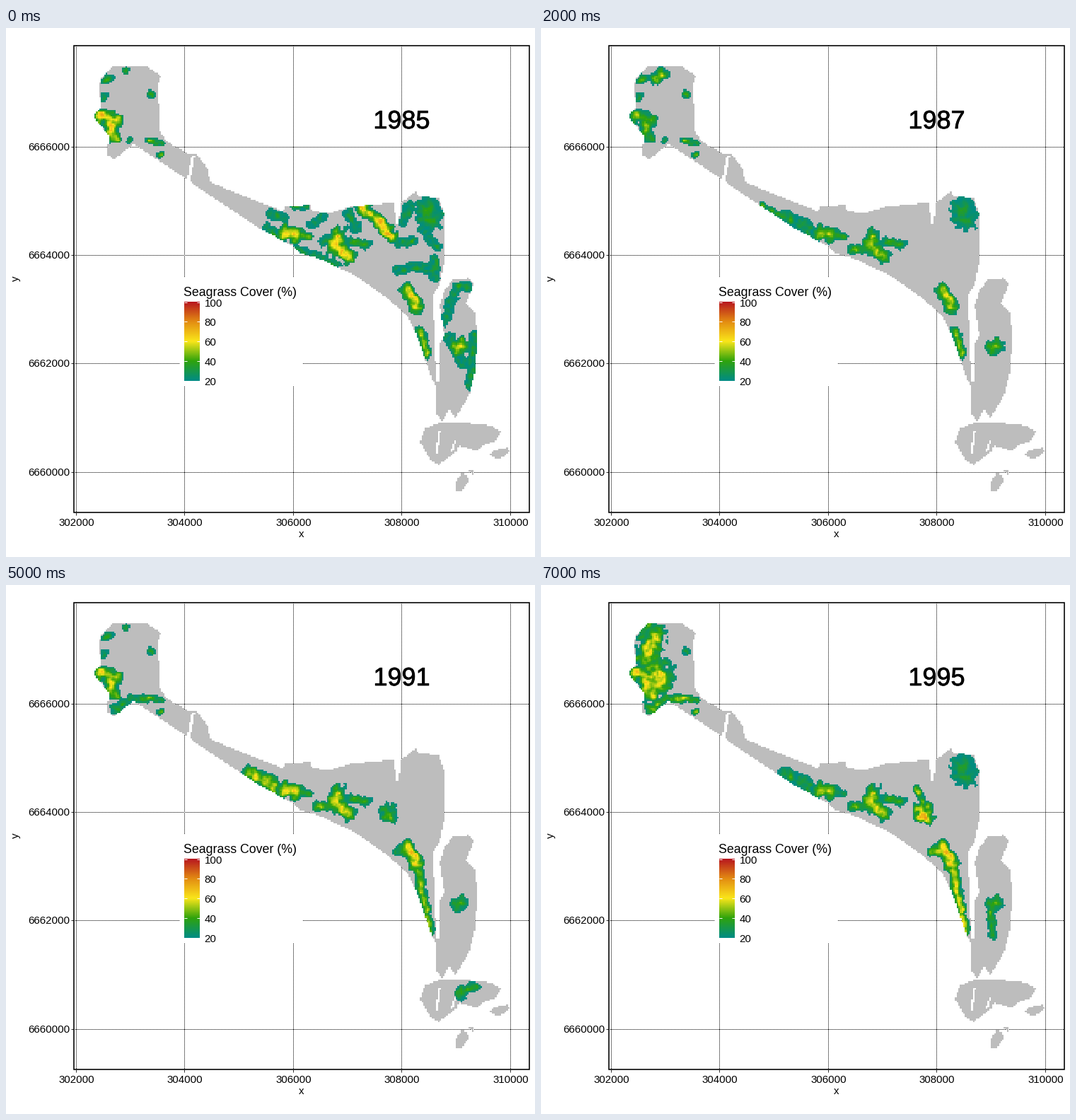
These frames come from a looping animation (748x748 px, 8 s). A matplotlib script:

```python
import numpy as np
import matplotlib.pyplot as plt
from matplotlib.animation import FuncAnimation
from matplotlib.colors import LinearSegmentedColormap
from matplotlib.path import Path
from matplotlib.patches import Rectangle
from matplotlib.patheffects import withStroke

SIZE, DPI = 748, 100
PX = 72 / DPI
CELL, COLS, ROWS = 2.3, 255, 262
LEFT, TOP = 125.0, 54.0
STEP = 153.4  # pixels per 2000 m
YEARS = [1985, 1986, 1987, 1988, 1990, 1991, 1993, 1995]

plt.rcParams["font.family"] = "Liberation Sans"
COVER = LinearSegmentedColormap.from_list(
    "cover", ["#008c84", "#2fa30c", "#fae61a", "#e38c12", "#b8171f"])

gx, gy = np.meshgrid(LEFT + (np.arange(COLS) + .5) * CELL,
                     TOP + (np.arange(ROWS) + .5) * CELL)

# Key points of the coast, in stage pixels
head = [(152, 54), (200, 55), (219, 68), (215, 79), (217, 145), (228, 161),
        (258, 178), (270, 178), (285, 200), (289, 218), (320, 231)]
north = [(358, 246), (392, 259), (395, 252), (430, 250), (433, 258), (455, 262),
         (490, 252), (548, 247), (551, 276), (555, 277), (558, 248), (570, 238),
         (579, 231), (582, 237), (612, 241), (620, 266), (619, 330), (613, 362),
         (604, 377), (604, 400), (608, 500)]
lobe = [(612, 500), (612, 450), (619, 434), (613, 392), (619, 372), (632, 355),
        (655, 354), (661, 362), (650, 389), (663, 402), (666, 440), (662, 490),
        (655, 518), (635, 551), (626, 537), (617, 557), (609, 545), (609, 507)]
south = [(602, 497), (583, 440), (568, 409), (540, 382), (490, 348), (440, 325),
         (415, 318), (405, 308), (360, 284), (275, 228), (260, 217)]
west = [(267, 181), (262, 181), (256, 214), (205, 180), (180, 164), (153, 186),
        (144, 179), (145, 152), (125, 127), (125, 121), (134, 113), (132, 82),
        (134, 72)]
islands = [
    [(592, 566), (614, 557), (640, 557), (686, 562), (700, 571), (690, 585),
     (672, 590), (667, 598), (640, 590), (637, 598), (612, 617), (600, 611),
     (585, 585)],
    [(684, 603), (690, 597), (708, 593), (711, 599), (700, 608), (688, 607)],
    [(654, 626), (661, 623), (661, 632)],
    [(636, 641), (645, 628), (652, 633), (655, 640), (643, 655), (635, 653)]]
slits = [[(611, 570), (614, 570), (610, 602), (607, 602)],
         [(633, 584), (636, 583), (632, 597), (628, 601)]]


def inside(outlines):
    cells = np.column_stack([gx.ravel(), gy.ravel()])
    hits = [Path(o).contains_points(cells) for o in outlines]
    return np.any(hits, axis=0).reshape(gx.shape)


def noise(seed, passes):
    n = np.random.default_rng(seed).normal(size=gx.shape)
    for _ in range(passes):
        for axis in (0, 1):
            n = (np.roll(n, 1, axis) + 2 * n + np.roll(n, -1, axis)) / 4
    return n / n.std()


def distance(path):
    """Distance of every cell to a path of points."""
    best = np.hypot(gx - path[0][0], gy - path[0][1])
    for (x0, y0), (x1, y1) in zip(path[:-1], path[1:]):
        dx, dy = x1 - x0, y1 - y0
        t = np.clip(((gx - x0) * dx + (gy - y0) * dy) / (dx * dx + dy * dy), 0, 1)
        best = np.minimum(best, np.hypot(gx - x0 - t * dx, gy - y0 - t * dy))
    return best


land = inside([head + north + lobe + south + west] + islands) & ~inside(slits)
ragged, grain = noise(4, 2), noise(9, 1)
beds = []


def bed(radius, growth, *paths):
    """A seagrass bed: growth maps key years to its cover above 20 %."""
    near = np.min([distance(p) for p in paths], axis=0)
    beds.append((radius, growth, near))


# Western head
bed(11, {1985: 42, 1987: 24, 1990: 34, 1995: 38},
    [(132, 124), (155, 130)], [(146, 134), (149, 150)])
bed(18, {1991: 0, 1993: 28, 1995: 34},
    [(160, 72), (151, 102)], [(160, 118), (172, 132), (155, 145)])
bed(7, {1985: 16, 1986: 20, 1990: 14, 1995: 10},
    [(138, 75), (150, 71)], [(139, 97)], [(170, 60)], [(206, 94)])
bed(10, {1985: 0, 1986: 18, 1987: 26, 1988: 0}, [(160, 72), (172, 66)])
bed(6, {1985: 18, 1990: 14, 1995: 22},
    [(175, 160)], [(203, 159), (220, 162)], [(219, 180)])
bed(7, {1988: 0, 1990: 9, 1993: 32, 1995: 28}, [(152, 177), (178, 161), (200, 161)])

# Shore fringe of a single year
bed(6, {1985: 0, 1986: 24, 1987: 0}, south + west[2:5], [(151, 158), (152, 182)],
    [(602, 497), (616, 512), (612, 545), (600, 566), (587, 580), (597, 606)])

# Southern slope and middle banks
bed(5, {1986: 0, 1987: 14, 1990: 0}, [(312, 251), (345, 268)])
bed(12, {1986: 0, 1987: 9, 1990: 22, 1993: 48, 1995: 10}, [(346, 267), (378, 284)])
bed(11, {1985: 38, 1987: 26, 1990: 32, 1993: 46, 1995: 28}, [(393, 290), (409, 291)])
bed(7, {1985: 24, 1987: 18, 1990: 18, 1995: 8}, [(412, 292), (428, 294)])
bed(12, {1985: 44, 1987: 30, 1990: 38, 1995: 36}, [(469, 294), (463, 308), (484, 322)])
bed(9, {1986: 0, 1987: 18, 1993: 24, 1995: 18}, [(440, 312), (458, 311)])
bed(8, {1985: 16, 1995: 17}, [(487, 303), (508, 307)])
bed(13, {1986: 0, 1987: 2, 1990: 20, 1993: 34, 1995: 54}, [(539, 318), (543, 326)])
bed(6, {1991: 0, 1993: 14, 1995: 20}, [(531, 288), (540, 310)])
bed(5, {1985: 12, 1986: 18, 1987: 0, 1988: 0, 1990: 12, 1991: 0}, [(405, 253), (425, 253)])

# Northern banks
bed(9, {1985: 44, 1986: 0}, [(503, 254), (524, 270), (545, 294)])
bed(15, {1985: 0, 1986: 14, 1987: 0}, [(508, 260), (525, 272), (556, 300)])
bed(22, {1985: 14, 1987: 10, 1990: 7, 1991: 0, 1993: 0, 1995: 10}, [(597, 258), (598, 267)])
bed(8, {1985: 9, 1986: 8, 1987: 0}, [(552, 342), (578, 338), (606, 343)])
bed(9, {1985: 8, 1986: 0},
    [(374, 261), (392, 267)], [(370, 283), (390, 298)], [(410, 314), (468, 333)],
    [(430, 278), (448, 266)], [(448, 304), (462, 296)], [(484, 262), (496, 284)],
    [(572, 250), (562, 272)], [(556, 304), (575, 302)], [(588, 284), (608, 310)],
    [(605, 325), (606, 354)])

# Southern point and spit
bed(10, {1985: 38, 1986: 30, 1990: 42, 1995: 44}, [(567, 371), (576, 382), (580, 394)])
bed(7, {1988: 0, 1990: 14, 1995: 34}, [(553, 377), (570, 375)])
bed(8, {1985: 26, 1990: 20, 1993: 36, 1995: 34}, [(585, 429), (594, 460)])
bed(8, {1987: 0, 1990: 18, 1993: 32, 1995: 32}, [(582, 397), (587, 425)], [(595, 470), (599, 489)])

# Eastern lobe and islet
bed(11, {1985: 40, 1987: 28, 1990: 24, 1993: 15, 1995: 24}, [(638, 452), (643, 450)])
bed(7, {1991: 0, 1993: 8, 1995: 18}, [(635, 464), (639, 496)])
bed(9, {1985: 9, 1986: 0},
    [(652, 366), (640, 366), (628, 387), (621, 415)], [(626, 436), (645, 475)],
    [(662, 434), (661, 470), (657, 505)])
bed(9, {1988: 0, 1990: 22, 1991: 14, 1993: 0}, [(643, 582), (644, 574), (664, 567)])


def paint(year):
    cover = np.zeros(gx.shape)
    for radius, growth, near in beds:
        gain = np.interp(year, list(growth), list(growth.values()))
        if gain < 3:
            continue
        q = 1 - near / (radius * (.8 + gain / 150)) + .17 * ragged
        rise = np.clip(1.15 * q, 0, 1)
        bump = 20 + gain * rise + 5 * grain * rise
        cover = np.maximum(cover, np.where(q > 0, np.maximum(bump, 20), 0))
    rgba = np.zeros(gx.shape + (4,))
    rgba[land] = (.745, .745, .745, 1)
    grass = land & (cover > 0)
    rgba[grass] = COVER((cover[grass] - 20) / 80)
    return rgba


maps = [paint(year) for year in YEARS]

fig = plt.figure(figsize=(SIZE / DPI, SIZE / DPI), dpi=DPI, facecolor="white")
ax = fig.add_axes([0, 0, 1, 1])
ax.axis("off")


def label(x, y, text, size=15, **kw):
    return ax.text(x, y, text, fontsize=size * PX, color="black", **kw)


def line(xs, ys, color="black", **kw):
    ax.plot(xs, ys, color=color, lw=PX, solid_capstyle="butt", **kw)


# Panel, grid and axes
dots = dict(linestyle=(0, (1, 2)), dash_capstyle="butt", antialiased=False, zorder=1)
for i in range(5):
    x = int(99.4 + STEP * i) + .5
    line([x, x], [25, 684], **dots)
    line([x, x], [685, 689], "#333333")
    label(x, 704, str(302000 + 2000 * i), ha="center")
for i in range(4):
    y = int(167.1 + STEP * i) + .5
    line([96, 740], [y, y], **dots)
    line([92, 96], [y, y], "#333333")
    label(90, y + 5.5, str(6666000 - 2000 * i), ha="right")
ax.add_patch(Rectangle((96.2, 25.2), 644.3, 659.3, fill=False, lw=1.6 * PX,
                       ec="black", joinstyle="miter", zorder=5))
label(418, 720, "x", ha="center")
label(14, 354, "y", ha="center", va="center", rotation=90)

# Legend
ax.add_patch(Rectangle((246, 352), 174, 155, color="white", lw=0, zorder=2))
label(251.5, 378.5, "Seagrass Cover (%)", 17.8)
ax.imshow(np.linspace(1, 0, 200)[:, None], cmap=COVER, zorder=3, aspect="auto",
          extent=(252, 274, 499, 387))
for i in range(5):
    y = 387.5 + 27.75 * i
    for x in (252, 269.6):
        line([x, x + 4.4], [y, y], "white", zorder=4)
    label(280.5, y + 6, str(100 - 20 * i))

picture = ax.imshow(maps[0], interpolation="nearest", zorder=2.5, aspect="auto",
                    extent=(LEFT, LEFT + COLS * CELL, TOP + ROWS * CELL, TOP))
title = label(559.5, 142, str(YEARS[0]), 36, ha="center",
              path_effects=[withStroke(linewidth=.6, foreground="black")])
ax.set_xlim(0, SIZE)
ax.set_ylim(SIZE, 0)


def update(i):
    picture.set_data(maps[i])
    title.set_text(str(YEARS[i]))
    return picture, title


anim = FuncAnimation(fig, update, frames=len(YEARS), interval=1000, repeat=True)
plt.show()
```
